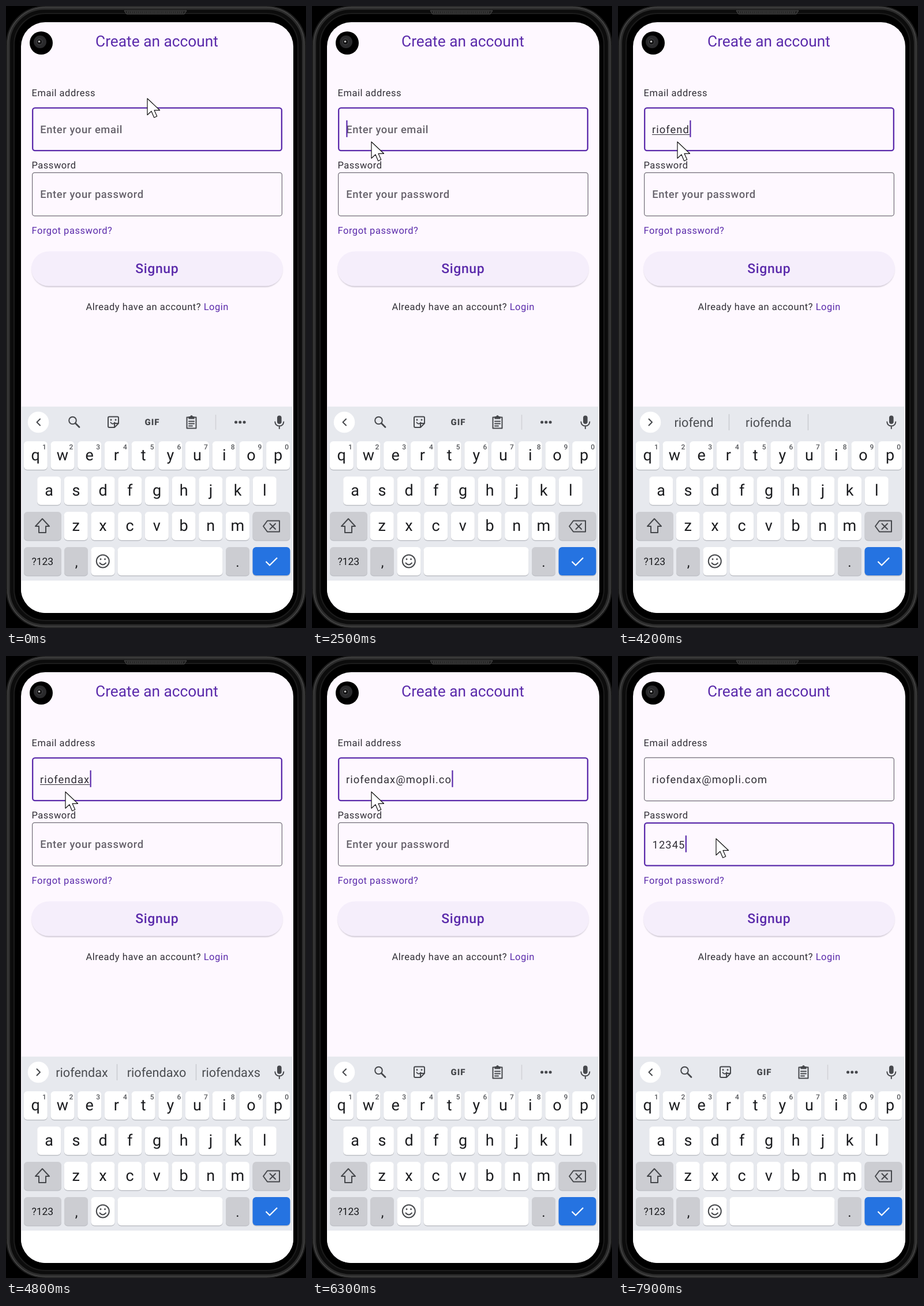
An HTML page for the animation above (8 s loop, 520 by 1076 pixels).

```html
<!DOCTYPE html>
<html lang="en">
<head>
<meta charset="utf-8">
<title>Create an account</title>
<style>
  html, body { margin: 0; width: 100%; height: 100%; overflow: hidden; background: #000; }
  svg { display: block; width: 100%; height: 100%; font-family: Roboto, sans-serif; text-rendering: geometricPrecision; }
  .label { font-size: 16.5px; letter-spacing: .52px; fill: #302e35; }
  .hint { font-size: 18.4px; letter-spacing: .58px; font-weight: 500; fill: #66626b; }
  .value { font-size: 18.4px; letter-spacing: 1.05px; fill: #302e35; }
  .link { fill: #5b2bab; }
  .mid { text-anchor: middle; }
  .key { font-size: 27px; fill: #1b1c1f; }
  .num { font-size: 12px; font-weight: 500; fill: #55575b; }
  .word { font-size: 21.7px; fill: #4b4d51; }
  .line { fill: none; stroke: #46484c; stroke-width: 2; stroke-linecap: round; stroke-linejoin: round; }
  .bold { stroke-width: 2.8; }
  .rim { fill: none; }
</style>
</head>
<body>
<svg viewBox="0 0 520 1076" preserveAspectRatio="none">
  <defs>
    <clipPath id="screen"><rect x="26" y="28" width="472" height="1022" rx="42"/></clipPath>
    <filter id="soft" x="-5%" y="-20%" width="110%" height="150%"><feGaussianBlur stdDeviation="1.2"/></filter>
  </defs>

  <rect width="520" height="1076" fill="#000"/>
  <rect x=".5" y=".5" width="519" height="1075" rx="66" fill="#0c0c0c" stroke="#2e2e2e"/>
  <rect class="rim" x="4.500" y="4" width="511" height="1068" rx="62" stroke="#2b2b2b" stroke-width="5"/>
  <rect class="rim" x="3" y="2.500" width="514" height="1071" rx="64" stroke="#474747" stroke-width="1.500"/>
  <rect x="14" y="13" width="492" height="1050" rx="54" fill="#000" stroke="#1c1c1c" stroke-width="2"/>
  <path d="M205 8H313L309 14H209Z" fill="#202020" stroke="#505050"/>
  <path d="M210 11H308" stroke="#3d3d3d" stroke-width="3" stroke-dasharray="2 1.5"/>

  <g clip-path="url(#screen)">
    <rect x="26" y="28" width="472" height="1022" fill="#fef8ff"/>
    <rect x="26" y="994" width="472" height="56" fill="#fff"/>
    <rect x="27" y="693" width="470" height="301" fill="#e7e9ee"/>
  </g>

  <circle cx="61" cy="64" r="20" fill="#000"/>
  <circle cx="59" cy="62" r="11" fill="#2a2a2c"/>
  <circle cx="58" cy="62" r="5" fill="#141415" stroke="#4a4a4d"/>
  <circle cx="57.500" cy="61.500" r="1.800" fill="#bbb"/>

  <text class="mid link" x="261.5" y="70" font-size="26.3">Create an account</text>
  <text class="label" x="44.5" y="156">Email address</text>
  <text class="label" x="44.5" y="281">Password</text>
  <text class="label link" x="44.5" y="394">Forgot password?</text>
  <rect x="45" y="427" width="434" height="59" rx="29.5" fill="#a8a1b0" opacity=".65" filter="url(#soft)"/>
  <rect x="44" y="424.5" width="436" height="60" rx="30" fill="#f5eefb"/>
  <text class="mid link" x="261.8" y="462" font-size="23" font-weight="500" letter-spacing=".6">Signup</text>
  <text class="label" x="138.5" y="526">Already have an account? <tspan class="link">Login</tspan></text>

  <rect id="mailBox" rx="4" fill="none"/>
  <rect id="passBox" rx="4" fill="none"/>
  <text id="mailHint" class="hint" x="59.3" y="219.5">Enter your email</text>
  <text id="passHint" class="hint" x="59.3" y="332">Enter your password</text>
  <text id="mail" class="value" x="59" y="220"></text>
  <text id="pass" class="value" x="59.5" y="333"></text>
  <path id="under" stroke="#302e35" stroke-width="1.2"/>
  <rect id="caret" width="2.2" height="29" fill="#5b2bab"/>

  <g id="keys"></g>

  <circle cx="56" cy="720" r="18.3" fill="#fff"/>
  <path id="chevron" class="line"/>
  <g id="tools">
    <circle class="line" cx="115.5" cy="717" r="6.3"/>
    <path class="line bold" d="M120.5 722L127 728.5"/>
    <path class="line" d="M179 710.5H193Q195 710.5 195 712.5V722L188 729H179Q177 729 177 727V712.5Q177 710.5 179 710.5ZM195 722H190Q188 722 188 724V729M181.5 720.5Q185 725 188.5 720.5"/>
    <path class="line bold" d="M182 716H182.1M190 716H190.1"/>
    <text class="mid" x="253.5" y="725" font-size="15" font-weight="900" letter-spacing="1" fill="#46484c">GIF</text>
    <path class="line" d="M313.5 711.5H329.5V730.5H313.5ZM317 718.5H326M317 722.5H326M317 726.5H323"/>
    <path d="M316.5 710H319Q321.5 706 324 710H326.5V714.5H316.5Z" fill="#46484c"/>
    <path d="M363.5 707V733" stroke="#d0d2d7" stroke-width="1.5"/>
    <path class="line" style="stroke-width:5" d="M398.500 720H398.600M405.700 720H405.800M413 720H413.100"/>
  </g>
  <g id="words">
    <path d="M192.5 706V734M329.5 706V734" stroke="#c6c8cd" stroke-width="1.3"/>
    <text id="w0" class="mid word" x="131.5" y="728"></text>
    <text id="w1" class="mid word" x="261" y="728"></text>
    <text id="w2" class="mid word" x="390" y="728"></text>
    <text id="w1Top" class="mid" x="261" y="711" font-size="15.5" font-weight="500" fill="#4b4d51"></text>
    <text id="w1Low" class="mid" x="260.5" y="731" font-size="14.5" fill="#4b4d51">@mopli.com</text>
  </g>
  <rect x="470" y="708.5" width="7.6" height="14.5" rx="3.8" fill="#46484c"/>
  <path class="line" d="M466.3 719.5Q467 726.5 473.8 726.5T481.3 719.5M473.8 727V731"/>

  <path id="mouse" d="M0 0V28.5L7 22L11.7 33L16.7 30.8L12 20.3H21.5Z" fill="#fff" stroke="#111" stroke-width="1.2" stroke-linejoin="round"/>
</svg>

<script>
const $ = id => document.getElementById(id);
const LOOP = 8000, STEP = 100;
const PURPLE = '#5b2bab';

// Keyboard
const GREY = '#cccdd2', PITCH = 46.7;
const key = (x, y, w, fill = '#fff') =>
  `<rect x="${x}" y="${y + 1.5}" width="${w}" height="49" rx="6" fill="#bfc1c7"/>` +
  `<rect x="${x}" y="${y}" width="${w}" height="49" rx="6" fill="${fill}"/>`;
const glyph = (c, x, y, cls = 'key', size = '') =>
  `<text class="mid ${cls}" x="${x}" y="${y}"${size && ` style="font-size:${size}px"`}>${c}</text>`;

function keyboard() {
  let out = '';
  [['qwertyuiop', 51.3, 753], ['asdfghjkl', 74.7, 814], ['zxcvbnm', 121.2, 875]].forEach(([row, x0, y], r) => {
    [...row].forEach((c, i) => {
      const x = x0 + i * PITCH;
      out += key(x - 20.5, y, 41) + glyph(c, x, y + 33);
      if (r === 0) out += glyph((i + 1) % 10, x + 15, y + 14, 'num');
    });
  });
  out += key(31, 875, 65, GREY) + key(427.5, 875, 65, GREY);
  out += '<path class="line" d="M63 887L75 900H69V911H57V900H51Z"/>';
  out += '<path class="line" d="M453 890.5H474V909.5H453L446 900ZM457.5 895.5L467 905M467 895.5L457.5 905"/>';
  out += key(31, 936, 65, GREY) + glyph('?123', 63.3, 967, 'key', 17.5);
  out += key(101, 936, 41, GREY) + glyph(',', 122, 970, 'key', 24);
  out += key(147.5, 936, 41) + key(193.5, 936, 182);
  out += '<circle class="line" cx="167.8" cy="960.5" r="11"/>' +
         '<path class="line" d="M162.5 963.5Q167.8 969.5 173 963.5"/>' +
         '<path class="line bold" d="M164 957H164.1M171.5 957H171.6"/>';
  out += key(381, 936, 41, GREY) + glyph('.', 401.5, 970, 'key', 24);
  out += key(427.5, 936, 65, '#2573e1');
  out += '<path d="M450.5 961L457 967.5L470 954.5" fill="none" stroke="#fff" stroke-width="2.2"/>';
  return out;
}
$('keys').innerHTML = keyboard();

// Time tables
const MAIL = 'riofendax@mopli.com';
const firstWord = [[2700, 'r'], [2800, 'ri'], [3000, 'ris'], [3500, 'ri'], [3600, 'rio']];
const mailTimes = [3800, 3900, 4000, 4200, 4600, 4700, 5200, 5400, 5500, 5700, 5800, 5900, 6100, 6200, 6300, 6500];
const passTimes = [7200, 7400, 7600, 7800, 7900];
const caretFlips = [400, 600, 900, 1200, 1400, 1700, 2000, 2200, 2500, 3200, 3500, 5000, 5200];
const path = [
  [0, 245, 160], [400, 57, 256], [1200, 55, 258], [1400, 43, 275], [1500, 26, 282],
  [1800, 103, 235], [6500, 103, 235], [6600, 92, 266], [6700, 128, 350], [6900, 170, 316]
];

const passed = (times, t) => times.filter(x => x <= t).length;

function mailAt(t) {
  const n = passed(mailTimes, t);
  if (n) return MAIL.slice(0, 3 + n);
  return firstWord.reduce((s, [at, text]) => at <= t ? text : s, '');
}

function mouseAt(t) {
  const i = path.findIndex(p => p[0] > t);
  if (i < 0) return path[path.length - 1].slice(1);
  const [a, b] = [path[i - 1], path[i]];
  const k = (t - a[0]) / (b[0] - a[0]);
  return [1, 2].map(j => a[j] + (b[j] - a[j]) * k);
}

function guesses(s) {
  if (s.length <= 3) return [s, '', s === 'ris' ? 'rise' : s === 'rio' ? 'riot' : 'right'];
  if (s.length === 9) return [s, s + 'o', s + 's'];
  return [s, MAIL.slice(0, s.length + 1), ''];
}

// The outline grows inwards when the field is active.
function box(id, y, active) {
  const w = active ? 2.3 : 1.2;
  const set = { x: 45 + w / 2, y: y + w / 2, width: 434 - w, height: 76 - w,
    stroke: active ? PURPLE : '#716d77', 'stroke-width': w };
  for (const k in set) $(id).setAttribute(k, set[k]);
}

const show = (id, on) => $(id).setAttribute('visibility', on ? 'visible' : 'hidden');

function draw(t) {
  const mail = mailAt(t);
  const pass = '12345'.slice(0, passed(passTimes, t));
  const onPass = t >= 7000;
  const composing = mail !== '' && !mail.includes('@');

  box('mailBox', 175.2, !onPass);
  box('passBox', 287.7, onPass);
  show('mailHint', !mail);
  show('passHint', !pass);
  $('mail').textContent = mail;
  $('pass').textContent = pass;

  const mailEnd = 59 + (mail ? $('mail').getComputedTextLength() : 0);
  const passEnd = 59.5 + (pass ? $('pass').getComputedTextLength() : 0);
  $('under').setAttribute('d', composing ? `M59 222.5H${mailEnd}` : '');
  $('caret').setAttribute('x', (onPass ? passEnd : mailEnd) + .3);
  $('caret').setAttribute('y', onPass ? 310.5 : 197.8);
  show('caret', passed(caretFlips, t) % 2);

  show('tools', !composing);
  $('words').setAttribute('display', composing ? 'inline' : 'none');
  $('chevron').setAttribute('d', composing ? 'M53.5 714.5L59 720L53.5 725.5' : 'M59 714.5L53.5 720L59 725.5');
  if (composing) {
    const short = mail.length <= 3;
    guesses(mail).forEach((w, i) => $('w' + i).textContent = w);
    $('w1Top').textContent = short ? 'rio' : '';
    show('w1Low', short);
  }

  $('mouse').setAttribute('transform', `translate(${mouseAt(t).join(' ')})`);
}

const start = performance.now();
function tick() {
  const t = (performance.now() - start) % LOOP;
  draw(Math.floor(t / STEP) * STEP);
  requestAnimationFrame(tick);
}
draw(0);
requestAnimationFrame(tick);
</script>
</body>
</html>
```
